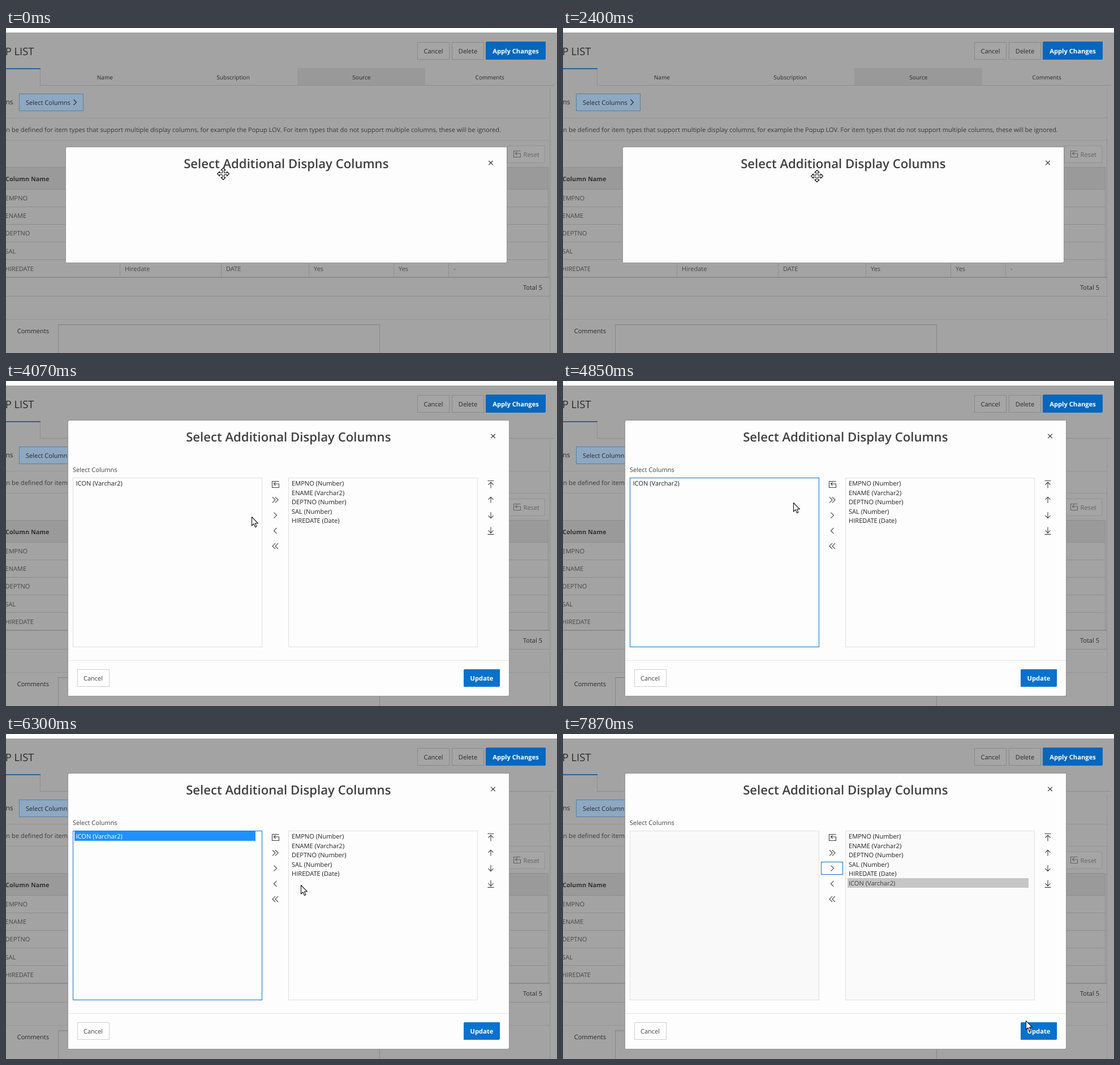
An HTML page for the animation above (8 s loop, 974 by 575 pixels).

```html
<!DOCTYPE html>
<html lang="en">
<head>
<meta charset="utf-8">
<title>Select Additional Display Columns</title>
<style>
  html, body { margin: 0; width: 100%; height: 100%; overflow: hidden; background: #fff; }
  svg { display: block; width: 974px; height: 575px; }
  text { font-family: "Open Sans", "Noto Sans", sans-serif; text-rendering: geometricPrecision; white-space: pre; }
  rect, .rule { shape-rendering: crispEdges; }
</style>
</head>
<body>
<svg id="stage" viewBox="0 0 974 575"></svg>
<script>
const LOOP = 8000;
const STEP = 150;
const BLUE = '#0572ce';
const ROW = 31.2;

const text = (x, y, str, { size = 11.05, fill = '#2a2a2a', weight = 400, anchor = 'start', id = '' } = {}) =>
  `<text id="${id}" x="${x}" y="${y}" font-size="${size}" fill="${fill}" font-weight="${weight}" text-anchor="${anchor}">${str}</text>`;
const fillRect = (x, y, w, h, fill, r = 0) =>
  `<rect x="${x}" y="${y}" width="${w}" height="${h}" rx="${r}" fill="${fill}"/>`;
const frame = (x, y, w, h, stroke, fill, id = '') =>
  `<rect id="${id}" x="${x + .5}" y="${y + .5}" width="${w - 1}" height="${h - 1}" stroke="${stroke}" fill="${fill}"/>`;
const rule = (d, stroke = '#8e8e8e') => `<path class="rule" d="${d}" stroke="${stroke}" fill="none"/>`;
const icon = (x, y, d, { turn = 0, stroke = '#404040' } = {}) =>
  `<path transform="translate(${x} ${y}) rotate(${turn})" d="${d}" stroke="${stroke}" stroke-width="1.1" fill="none"/>`;
const group = (id, content) => `<g id="${id}">${content}</g>`;
const button = (x, y, label, { stroke = '#898989', fill = '#a5a5a5', color = '#2a2a2a' } = {}) =>
  frame(x, y, 57, 31, stroke, fill) + text(x + 28.5, y + 20, label, { anchor: 'middle', fill: color });
const hotButton = (x, y, w, h, label, fill) =>
  fillRect(x, y, w, h, fill, 2)
  + text(x + w / 2, y + h / 2 + 4.5, label, { size: 11.2, weight: 700, fill: '#fff', anchor: 'middle' });

const CHEVRON = 'M-2.5-5L2.5 0L-2.5 5';
const DOUBLE = 'M-5-5L0 0L-5 5M0-5L5 0L0 5';
const ARROW = 'M0 5.5V-5M-4.5-.5L0-5L4.5-.5';
const ARROW_TO_BAR = 'M-5.5-6.5H5.5M0 6.5V-4M-4.5 .5L0-4L4.5 .5';
const RESET = 'M6.5-5.5H-5.5V5.5H6.5V-1H-2.5M.5-4L-2.5-1L.5 2';
const CROSS = 'M-3.7-3.7L3.7 3.7M3.7-3.7L-3.7 3.7';

function header() {
  const tabs = ['Name', 'Subscription', 'Source', 'Comments'];
  return text(49.5, 48, 'P LIST', { size: 18.4, anchor: 'end' })
    + button(727, 25, 'Cancel') + button(788, 25, 'Delete')
    + hotButton(848, 24, 106, 32, 'Apply Changes', '#0567be')
    + fillRect(515, 71, 226, 30, '#999')
    + rule('M60.5 72V101.5H969') + fillRect(0, 71, 61, 2, '#2b6298')
    + tabs.map((name, i) => text(174.8 + 226.8 * i, 90.5, name, { size: 10.05, anchor: 'middle' })).join('')
    + text(12.5, 135, 'ns', { size: 12, anchor: 'end' })
    + frame(23, 116, 114, 31, '#5f7d98', '#8da8c2') + text(35, 136, 'Select Columns')
    + icon(122, 131.5, CHEVRON, { stroke: '#262626' });
}

function table() {
  const dim = { fill: '#474747' };
  const names = ['EMPNO', 'ENAME', 'DEPTNO', 'SAL', 'HIREDATE'];
  const cells = [[210, 'Hiredate'], [389, 'DATE'], [544, 'Yes'], [694, 'Yes'], [791, '-']];
  return fillRect(0, 246, 959, 40, '#9a9a9a') + rule('M0 246.5H958.5V441')
    + text(76.5, 270.5, 'Column Name', { size: 10.9, weight: 700, anchor: 'end', fill: '#333' })
    + names.map((name, i) =>
        rule(`M0 ${Math.floor(285 + ROW * i) + .5}H958`) + text(-1.5, 305 + ROW * i, name, dim)).join('')
    + cells.map(([x, str]) => rule(`M${x - 8.5} 286V441`) + text(x, 430, str, dim)).join('')
    + fillRect(0, 440, 961, 2, '#8b8b8b') + rule('M0 474.5H961.5V198')
    + text(948, 463, 'Total 5', { anchor: 'end' });
}

const page = () =>
  fillRect(0, 8, 974, 567, '#a3a3a3')
  + rule('M961.5 107V575M0 159.5H961M0 198.5H961M0 515.5H961', '#969696')
  + header()
  + text(875, 184, 'n be defined for item types that support multiple display columns, for example the Popup LOV. For item types that do not support multiple columns, these will be ignored.', { size: 11.07, anchor: 'end', fill: '#3a3a3a' })
  + frame(886, 208, 67, 31, '#939393', '#a5a5a5')
  + icon(903, 223, RESET, { stroke: '#646464' }) + text(943, 228, 'Reset', { anchor: 'end', fill: '#646464' })
  + table()
  + text(76, 540, 'Comments', { anchor: 'end' })
  + frame(92, 524, 569, 60, '#888', '#a3a3a3') + rule('M93 525.5H660', '#949494');

const dialog = (x, y, w, h) =>
  fillRect(x - 1, y - 1, w + 2, h + 2, '#959595', 3) + fillRect(x, y, w, h, '#fdfdfd', 2)
  + text(x + 389.3, y + 37, 'Select Additional Display Columns', { size: 22.15, weight: 600, fill: '#404040', anchor: 'middle' })
  + icon(x + 751, y + 27.5, CROSS, { stroke: '#222' });

function shuttle() {
  const dark = { fill: '#222', size: 11.1 };
  const chosen = ['EMPNO (Number)', 'ENAME (Varchar2)', 'DEPTNO (Number)', 'SAL (Number)', 'HIREDATE (Date)'];
  const slot = i => 183 + 27.3 * i;
  // shapes run down the column, then back up it turned around
  const mirrored = (x, first, shapes) =>
    [...shapes, ...shapes.toReversed()].map((d, i) =>
      icon(x, slot(first + i), d, { turn: i < shapes.length ? 0 : 180 })).join('');
  return dialog(110, 70, 779, 487)
    + text(118, 160.5, 'Select Columns', { fill: '#404040' })
    + frame(118, 171, 335, 300, '#dfdfdf', '#fdfdfd', 'leftList')
    + frame(499, 171, 335, 300, '#dfdfdf', '#fdfdfd', 'rightList')
    + '<rect id="mark" width="320" height="17"/>'
    + text(0, 0, 'ICON (Varchar2)', { ...dark, id: 'item' })
    + chosen.map((name, i) => text(505, 185 + 16.5 * i, name, dark)).join('')
    + frame(456, 226, 39, 23, BLUE, '#fff', 'buttonFocus')
    + icon(476, slot(0), RESET)
    + mirrored(476, 1, [DOUBLE, CHEVRON])
    + mirrored(857, 0, [ARROW_TO_BAR, ARROW])
    + rule('M110 494.5H889', '#e4e4e4')
    + button(125.5, 510, 'Cancel', { stroke: '#cfcfcf', fill: '#fff', color: '#404040' })
    + hotButton(809, 510, 64, 31, 'Update', BLUE);
}

const outline = (d, turn = 0) =>
  `<path d="${d}" transform="rotate(${turn})" fill="#fff" stroke="#111" stroke-width="1.1" stroke-linejoin="round"/>`;
const pointers = {
  move: [0, 90, 180, 270].map(turn => outline('M-1.5-1.5V-6.5H-4L0-10.5L4-6.5H1.5V-1.5', turn)).join(''),
  arrow: outline('M.5 .5V16L4 12.6L6.6 18.5L9 17.4L6.5 11.8H11.5Z'),
  hand: outline('M-2 14V1.5a1.8 1.8 0 0 1 3.6 0V7.5L7 8.5q2 .6 2 3v5l-2 6H-3L-7.5 14.5q-.5-3 3-2zM1.6 8V12M4.8 8.8V12')
};

const stage = document.getElementById('stage');
stage.innerHTML = page()
  + group('loading', dialog(106, 211, 779, 204))
  + group('loaded', shuttle())
  + Object.entries(pointers).map(([id, shape]) => group(id, shape)).join('');

// pointer moves in order; each starts where the last one ended, sag bows its path downwards
const HOME = { x: 384, y: 258 };
const MOVES = [
  { start: 150, end: 1060, x: 450, y: 264, sag: 12 },
  { start: 2400, end: 3180, x: 434, y: 243 },
  { start: 3460, end: 3610, x: 434, y: 240 },
  { start: 4200, end: 4460, x: 434, y: 219 },
  { start: 4730, end: 5260, x: 179, y: 179 },
  { start: 5640, end: 5760, x: 381, y: 207 },
  { start: 5910, end: 6190, x: 521, y: 267 },
  { start: 6330, end: 6750, x: 479, y: 240 },
  { start: 7310, end: 7870, x: 818, y: 507 }
];
const OPEN = 4070, FOCUS = 4200, SELECT = 5390, HOVER = 6750, PRESS = 7030, TRANSFER = 7180, LEAVE = 7310;

const smooth = u => u * u * (3 - 2 * u);

function pointerAt(t) {
  let { x, y } = HOME;
  for (const move of MOVES) {
    if (t < move.start) break;
    const gaps = Math.round((move.end - move.start) / STEP);
    const passed = Math.floor((t - move.start) / (move.end - move.start) * gaps + 1e-6);
    const u = smooth(Math.min(1, (passed + 1) / (gaps + 1)));
    x += (move.x - x) * u;
    y += (move.y - y) * u + 4 * (move.sag ?? 0) * u * (1 - u);
  }
  return `translate(${Math.round(x)} ${Math.round(y)})`;
}

const byId = id => document.getElementById(id);
const show = (id, on) => { byId(id).style.display = on ? '' : 'none'; };
const set = (id, attrs) => Object.entries(attrs).forEach(([key, value]) => byId(id).setAttribute(key, value));

function draw(t) {
  const open = t >= OPEN, pressed = t >= PRESS, moved = t >= TRANSFER;
  show('loading', !open);
  show('loaded', open);
  show('mark', t >= SELECT);
  show('buttonFocus', pressed);

  set('leftList', {
    stroke: t >= FOCUS && !pressed ? BLUE : '#dfdfdf',
    fill: pressed ? '#f9f9f9' : '#fdfdfd'
  });
  set('rightList', { fill: moved ? '#fafafa' : '#fdfdfd' });
  set('mark', { x: moved ? 503 : 121, y: moved ? 255 : 172, fill: pressed ? '#c6c6c6' : '#1e90ff' });
  set('item', {
    x: moved ? 505 : 123.5, y: moved ? 267.5 : 185,
    fill: pressed ? '#404040' : t >= SELECT ? '#fff' : '#222'
  });

  const current = !open ? 'move' : t >= HOVER && t < LEAVE ? 'hand' : 'arrow';
  for (const id of Object.keys(pointers)) show(id, id === current);
  set(current, { transform: pointerAt(t) });
}

const start = performance.now();
function tick() {
  draw((performance.now() - start) % LOOP);
  requestAnimationFrame(tick);
}
tick();
</script>
</body>
</html>
```
